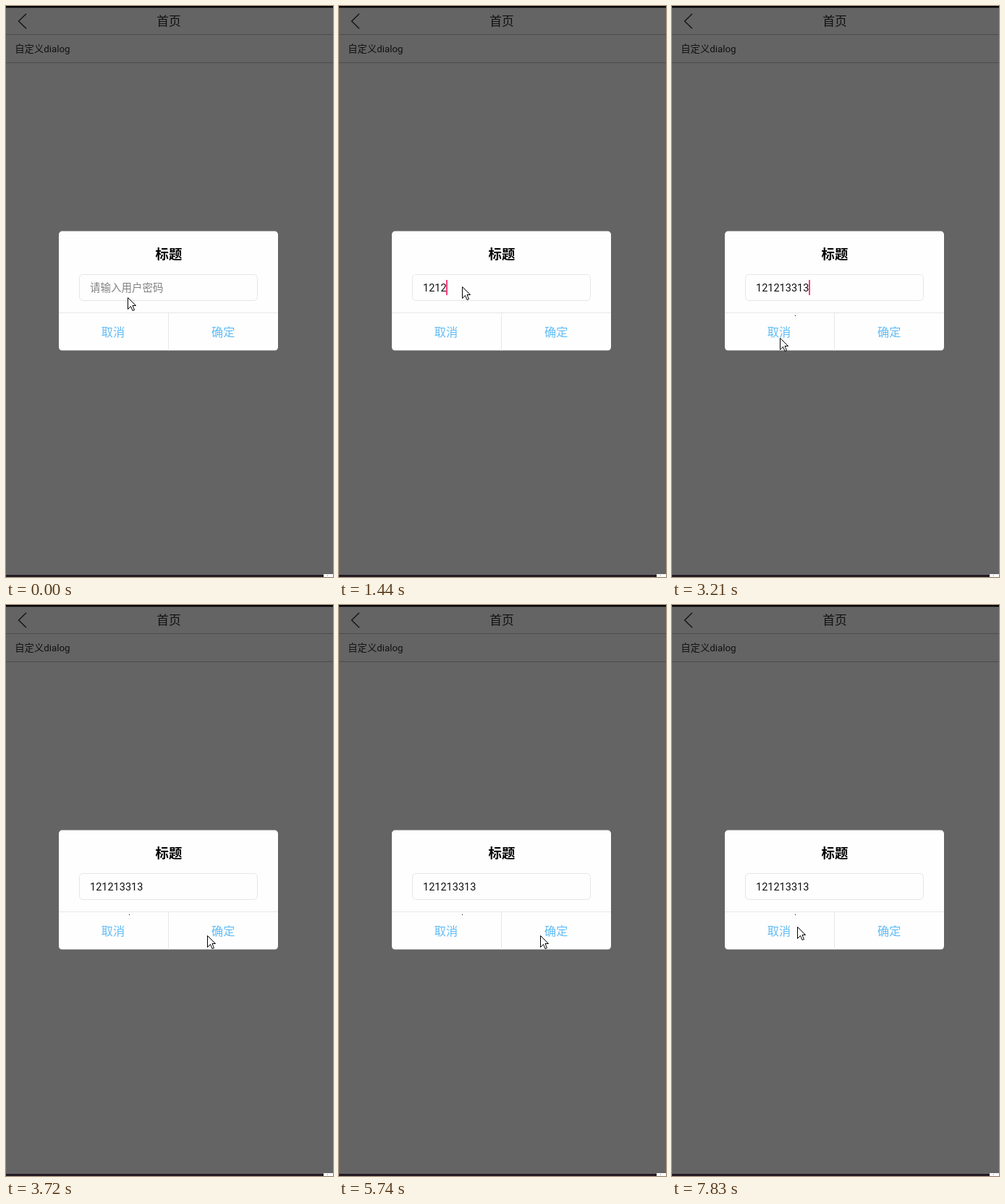
An HTML page that plays this animation: 452x790 px, repeating every 8 s.

```html
<!DOCTYPE html>
<html lang="zh-CN">
<head>
<meta charset="utf-8">
<style>
html, body { margin: 0; width: 100%; height: 100%; overflow: hidden; background: #646464; }
svg { display: block; width: 452px; height: 790px; font-family: Roboto, 'Noto Sans CJK SC', 'Noto Sans CJK', sans-serif; }
.mid { text-anchor: middle; }
.line { fill: none; stroke: #e6e6e6; }
.button { font-size: 16.2px; fill: #62bcf6; }
.field { font-size: 14.5px; }
</style>
</head>
<body>
<svg viewBox="0 0 452 790">
  <rect width="452" height="790" fill="#646464"/>
  <rect width="452" height="2.4" fill="#000"/>
  <path d="M0 39.5H452M0 78.5H452" stroke="#4c4c4c"/>
  <path d="M28 10.8L17.5 21 28 31.2" fill="none" stroke="#111" stroke-width="1.3"/>
  <text class="mid" x="225" y="27.2" font-size="16.8" fill="#111">首页</text>
  <text x="12.3" y="64" font-size="13.3" fill="#111">自定义dialog</text>
  <rect y="787" width="439" height="3" fill="#241a23"/>
  <rect x="439" y="786" width="13" height="4" fill="#fff"/>
  <rect x="444" y="787" width="1" height="2" fill="#bbb"/>

  <rect x="73" y="311.6" width="303" height="165" rx="4.5" fill="#fefefe"/>
  <text class="mid" x="225" y="350.2" font-size="18.4" font-weight="700">标题</text>
  <rect class="line" x="101.5" y="371.5" width="246" height="36" rx="5"/>
  <path class="line" d="M73 424.5H376M224.5 425V476.6"/>
  <text class="mid button" x="148" y="457">取消</text>
  <text class="mid button" x="300.3" y="457">确定</text>
  <text id="hint" class="field" x="116" y="395" fill="#808080">请输入用户密码</text>
  <text id="entry" class="field" x="116" y="395" fill="#111"></text>
  <rect id="caret" y="379" width="2" height="21" fill="#fb3c80"/>
  <rect id="dot" x="170" y="428" width="1" height="1"/>
  <path id="pointer" d="M.5.5V16.5L4.5 12.5 7 18.5 9.5 17.5 7 11.5H11.5Z" fill="#fff" stroke="#000"/>
</svg>
<script>
const LOOP = 8000;
const TEXT = '121213313';
const DIGIT = 8.14;
const KEY_GAP = 90;
const BLINK = 492;
const STEP = 120;
const FOCUS = 430;

const bursts = [{ start: 1170, keys: 4 }, { start: 1860, keys: 5 }];
const typeStart = bursts[0].start;
const typeEnd = bursts[1].start + bursts[1].keys * KEY_GAP - KEY_GAP;

const home = { x: 168, y: 403 };
const glides = [
  { start: 150, steps: 1, x: 170, y: 388 },
  { start: 2260, steps: 2, x: 149, y: 459 },
  { start: 3360, steps: 4, x: 278, y: 457 },
  { start: 7440, steps: 4, x: 173, y: 445 }
];

const [hint, entry, caret, dot, pointer] =
  ['hint', 'entry', 'caret', 'dot', 'pointer'].map(id => document.getElementById(id));

const clamp = (v, lo, hi) => Math.min(hi, Math.max(lo, v));
const ease = u => u < 0.5 ? 8 * u ** 4 : 1 - 8 * (1 - u) ** 4;
const show = (el, on) => el.setAttribute('visibility', on ? 'visible' : 'hidden');

// Ticks of a steady beat heard since start, from 0 up to max.
const beats = (t, start, gap, max) => clamp(1 + Math.floor((t - start) / gap), 0, max);

const typed = t => bursts.reduce((sum, b) => sum + beats(t, b.start, KEY_GAP, b.keys), 0);

function pointerAt(t) {
  return glides.reduce((p, g) => {
    const u = ease(beats(t, g.start, STEP, g.steps) / g.steps);
    return { x: p.x + (g.x - p.x) * u, y: p.y + (g.y - p.y) * u };
  }, home);
}

// Solid while typing, blinking otherwise.
function caretOn(t) {
  if (t >= typeStart && t < typeEnd) return true;
  const since = t - (t < typeStart ? FOCUS : typeEnd);
  return Math.floor(since / BLINK) % 2 === 0;
}

function draw(t) {
  const count = typed(t);
  const { x, y } = pointerAt(t);
  entry.textContent = TEXT.slice(0, count);
  show(hint, count === 0);
  caret.setAttribute('x', Math.floor(116 + count * DIGIT));
  show(caret, caretOn(t));
  // The speck is gone before typing and in the pause between bursts.
  show(dot, count > 0 && count !== bursts[0].keys);
  pointer.setAttribute('transform', `translate(${Math.round(x)} ${Math.round(y)})`);
}

const begin = performance.now();
function tick() {
  draw((performance.now() - begin) % LOOP);
  requestAnimationFrame(tick);
}
tick();
</script>
</body>
</html>
```
